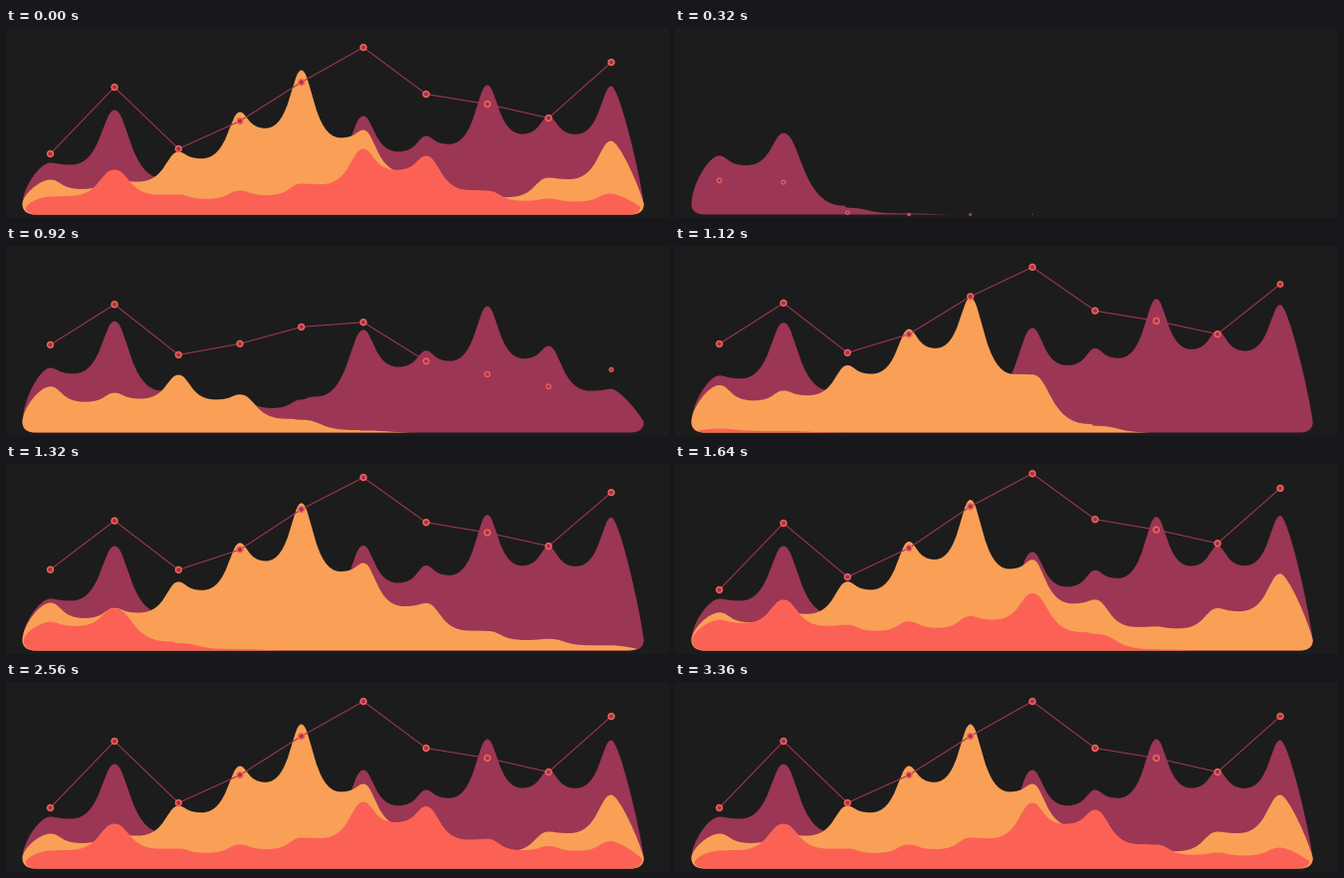
A matplotlib script that plays this animation: 666x191 px, repeating every 4360 ms.

```python
import numpy as np
import matplotlib.pyplot as plt
from matplotlib.animation import FuncAnimation
from matplotlib.patches import Circle, PathPatch
from matplotlib.path import Path

W, H, DPI = 666, 191, 100
STEP, FRAMES = 40, 109
BASE = 187.5
BG, PURPLE, ORANGE, RED = "#1c1c1c", "#9b3654", "#f9a056", "#fb6255"

IDX = np.arange(10)
X = np.array([44.5, 109, 173.3, 235, 296.7, 359, 422, 483.5, 545, 608])

# Charted values, as heights above the base
LAYERS = [
    (PURPLE, [52, 105, 33, 29, 27, 99, 79, 130, 99, 129]),
    (ORANGE, [35, 36, 63, 103, 145, 85, 45, 18, 37, 74]),
    (RED, [18, 45, 20, 24, 31, 66, 59, 24, 16, 21]),
]
LINE = np.array([61, 128, 66, 94, 133, 168, 121, 111, 97, 153])

# Areas start one after another; the line's points bunch up after the third
LAYER_GAP, POINT_GAP = 488, 82
LINE_START = 15 + 8 * IDX + 530 * IDX**4 / (IDX**4 + 19)
AREA_OVER = 6.5 + 6.5 * .05**IDX
LINE_OVER = 11.5 + 17 * (-.5)**IDX
LINE_SLOW = 1.6


def smooth(v):
    v = np.clip(v, 0, 1)
    return v * v * (3 - 2 * v)


def rise(u, mid=203, width=40, start=-170, end=800):
    """Long tails around a steep middle."""
    lo, hi, now = (np.arctan((np.clip(v, start, end) - mid) / width)
                   for v in (start, end, u))
    return (now - lo) / (hi - lo)


def heights(u, rest, over, fall, settled):
    """Rise past the resting height, then settle back."""
    up = rise(u)
    h = (rest + over) * up - over * smooth((u - fall) / (settled - fall))
    return np.maximum(h - 1.5 * (1 - up), 0)


def area_path(h):
    y = BASE - h
    low = np.maximum(0, 35 - h[[0, -1]])
    lx, rx = 16.5 + .2 * low[0], 640.7 - .25 * low[1]
    ly, ry = BASE - np.minimum(10.5, .35 * h[[0, -1]])
    grip = .26 + .2 * np.exp(-h / 40)

    pts = [(lx + 13, BASE),
           (lx + 5, BASE), (lx, (ly + 2 * BASE) / 3), (lx, ly),
           (lx, ly - .38 * (ly - y[0])), (X[0] - 11, y[0]), (X[0], y[0])]
    for i in range(9):
        # The dip sits at the harmonic mean, nearer to the lower peak
        total = h[i] + h[i + 1] + 1e-6
        vx = X[i] + (X[i + 1] - X[i]) * (h[i] + 5e-7) / total
        vy = BASE - 1.44 * h[i] * h[i + 1] / total
        a, b = vx - X[i], X[i + 1] - vx
        pts += [(X[i] + grip[i] * a, y[i]), (vx - .7 * a, vy), (vx, vy),
                (vx + .7 * b, vy), (X[i + 1] - grip[i + 1] * b, y[i + 1]),
                (X[i + 1], y[i + 1])]
    pts += [(X[-1] + 8, y[-1]), (rx - 4, ry - .26 * (ry - y[-1])), (rx, ry),
            (rx, (ry + 2 * BASE) / 3), (rx - 5, BASE), (rx - 13, BASE),
            (lx + 13, BASE)]
    codes = [Path.MOVETO] + [Path.CURVE4] * (len(pts) - 2) + [Path.LINETO]
    return Path(pts, codes)


fig = plt.figure(figsize=(W / DPI, H / DPI), dpi=DPI, facecolor=BG)
ax = fig.add_axes([0, 0, 1, 1])
ax.set_xlim(0, W)
ax.set_ylim(H, 0)
ax.axis("off")

areas = [ax.add_patch(PathPatch(area_path(np.zeros(10)), fc=color, lw=0, zorder=z))
         for z, (color, _) in enumerate(LAYERS, 1)]
line, = ax.plot([], [], color=PURPLE, lw=.8, zorder=5)
dots = [ax.add_patch(Circle((x, BASE), 0, fc=PURPLE, ec=RED, zorder=6)) for x in X]


def draw(k):
    t = (k or FRAMES) * STEP
    for n, (patch, (_, rest)) in enumerate(zip(areas, LAYERS)):
        u = t - n * LAYER_GAP - POINT_GAP * IDX
        patch.set_path(area_path(heights(u, np.array(rest), AREA_OVER, 950, 1250)))

    y = BASE - heights((t - LINE_START) / LINE_SLOW, LINE, LINE_OVER, 720, 990)
    drawn = (1 - np.cos(np.pi * min(t / 1160, 1))) / 2
    end = X[0] + drawn * (X[-1] - X[0])
    seen = X < end
    line.set_data(np.append(X[seen], end), np.append(y[seen], np.interp(end, X, y)))

    size = np.clip((t + 80 - 75 * IDX) / 600, 0, 1) ** .6
    for dot, x, cy, s in zip(dots, X, y, size):
        dot.center = x, cy
        dot.set_radius(2.9 * s)
        dot.set_linewidth(1.1 * s)
        dot.set_visible(bool(s > 0))
    return [*areas, line, *dots]


anim = FuncAnimation(fig, draw, frames=FRAMES, interval=STEP, repeat=True,
                     repeat_delay=0, blit=False)
plt.show()
```
